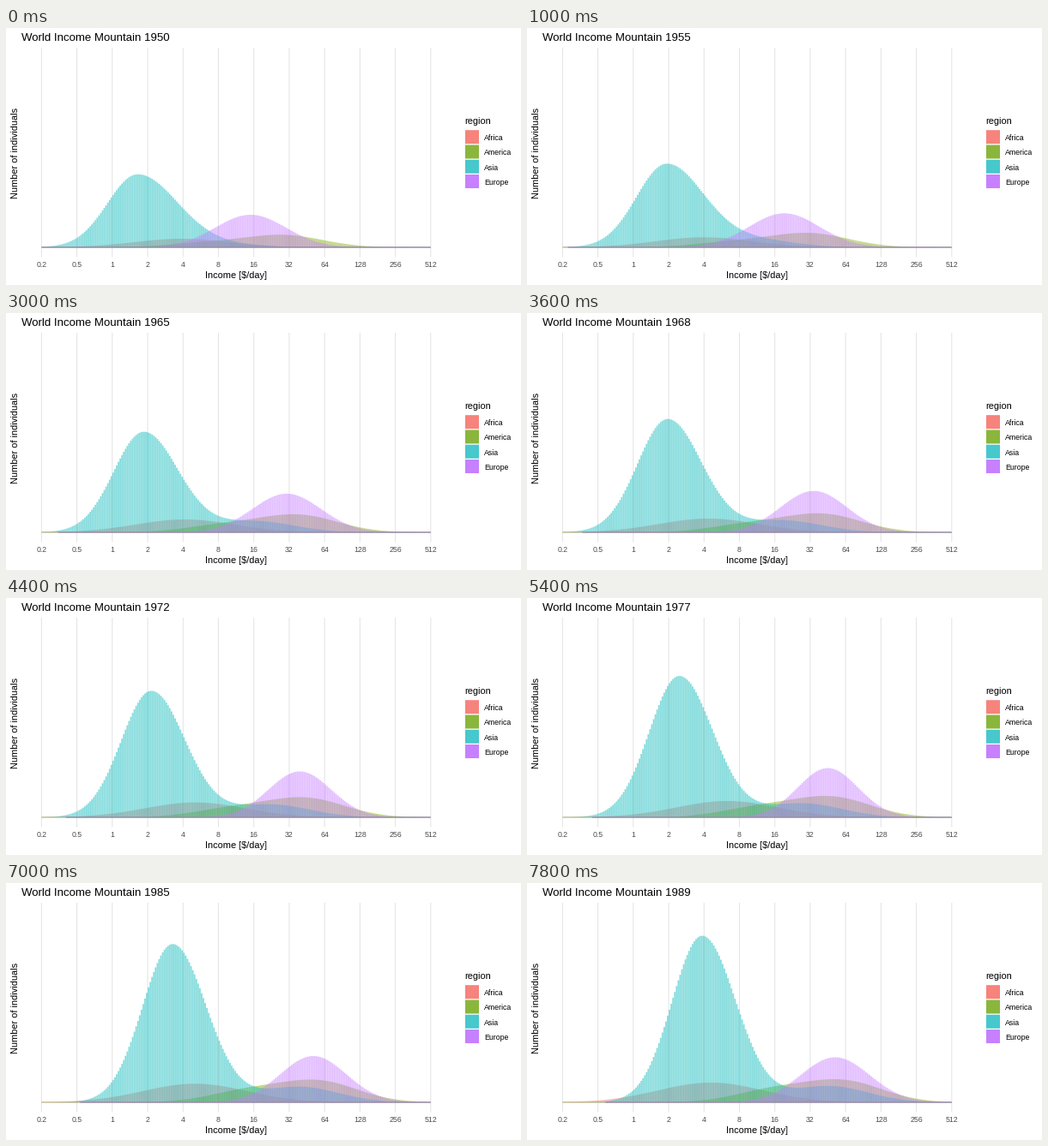
These frames come from a looping animation (600x300 px, 8 s). A matplotlib script:

```python
import numpy as np
import matplotlib.pyplot as plt
from matplotlib.animation import FuncAnimation
from matplotlib.collections import PolyCollection

plt.rcParams["font.family"] = "Liberation Sans"

W, H, DPI = 600, 300, 100
LEFT, STEP, DOUBLINGS, BASE = 41.4, 41.22, 11, 256
RIGHT = LEFT + DOUBLINGS * STEP
FIRST_YEAR, N_YEARS = 1950, 40
BINS = 220
PITCH = (RIGHT - LEFT) / BINS
CENTRES = LEFT + PITCH * (np.arange(BINS) + 0.5)

# bar colour, legend colour
COLORS = {
    "Africa": ("#F8766D", "#f6837c"),
    "America": ("#7CAE00", "#8ab63c"),
    "Asia": ("#10BABC", "#47c8cc"),
    "Europe": ("#C77CFF", "#c780ff"),
}


def bump(x, mid, width):
    return np.exp(-((x - mid) / width) ** 2)


def bell(height, mid, left, right=None):
    """Bell over the bins, with its own spread on each side."""
    spread = np.where(CENTRES < mid, left, right or left)
    return height * np.exp(-0.5 * ((CENTRES - mid) / spread) ** 2)


def africa(t, year):
    boom = bump(year, 1978, 7)
    return bell(10 + 13 * t, 205 + 7 * t + 24 * boom, 55 + 6 * t)


def america(t, year):
    rise = np.sin(np.pi * t / 2)
    return (bell(14 + 10 * rise, 324 + 46 * t, 45)
            + bell(5 + 9 * t, 235 + 52 * t, 44))


def asia(t, year):
    height = (85 + 109 * t - 14 * bump(year, 1962, 5)
              + 5 * bump(year, 1979, 6))
    mid = 153 + 51 * t ** 2 + 9 * bump(year, 1955.5, 3)
    poor = bell(height, mid, 35, 39 + 7 * (1 - t) ** 4)
    rich = bell(3 + 16 * np.sqrt(t), 252 + 100 * t, 45)
    return poor + rich


def europe(t, year):
    boom = bump(year, 1976.5, 9)
    mid = 285 + 74 * np.sin(np.pi * t / 2)
    return bell(38 + 13 * t + 10.5 * boom, mid, 41 - 6 * boom)


CURVES = {"Africa": africa, "America": america, "Asia": asia,
          "Europe": europe}


def bar_verts(heights):
    x0, x1 = CENTRES - 0.45 * PITCH, CENTRES + 0.45 * PITCH
    base, top = np.full(BINS, BASE), BASE - heights
    xs = np.stack([x0, x0, x1, x1], axis=1)
    ys = np.stack([base, top, top, base], axis=1)
    return np.stack([xs, ys], axis=2)


fig = plt.figure(figsize=(W / DPI, H / DPI), dpi=DPI, facecolor="white")
ax = fig.add_axes([0, 0, 1, 1])
ax.set(xlim=(0, W), ylim=(H, 0))
ax.axis("off")


def label(x, y, text, px, color="black", **kw):
    return ax.text(x, y, text, fontsize=px * 72 / DPI, color=color, **kw)


def line(xs, ys, color, z):
    return ax.plot(xs, ys, color=color, lw=0.75, zorder=z, snap=False,
                   solid_capstyle="butt")[0]


for i in range(DOUBLINGS + 1):
    x = LEFT + i * STEP
    line([x, x], [23, 267.5], "#e4e4e4", 1)
    income = 2.0 ** (i - 2)
    label(x, 279, f"{income:.1f}" if income < 1 else f"{income:.0f}", 8.8,
          "#4d4d4d", ha="center")

title = label(18, 15, "", 13.2)
label(268, 292, "Income [$/day]", 11, ha="center")
label(16, 146, "Number of individuals", 11, rotation=90,
      ha="right", va="center")
label(534, 112, "region", 11)

bars = {}
for i, (name, (color, key_color)) in enumerate(COLORS.items()):
    y = 119.2 + i * 17.28
    ax.add_patch(plt.Rectangle((535, y), 16, 16, color=key_color, lw=0,
                               snap=False))
    label(557, y + 11.8, name, 8.8)
    bars[name] = PolyCollection([], facecolors=color, alpha=0.5,
                                linewidths=0, zorder=2 + i, snap=False)
    ax.add_collection(bars[name], autolim=False)

line([LEFT, RIGHT], [BASE, BASE], "#b0a870", 7)
floor = line([LEFT, RIGHT], [BASE, BASE], "#8f7fc0", 8)


def draw(frame):
    year = FIRST_YEAR + frame
    t = frame / (N_YEARS - 1)
    title.set_text(f"World Income Mountain {year}")
    for name, coll in bars.items():
        coll.set_verts(bar_verts(CURVES[name](t, year)))
    floor.set_xdata([LEFT + 50 * t, RIGHT])
    return [title, floor, *bars.values()]


anim = FuncAnimation(fig, draw, frames=N_YEARS, interval=200,
                     repeat=True, repeat_delay=0)
plt.show()
```
